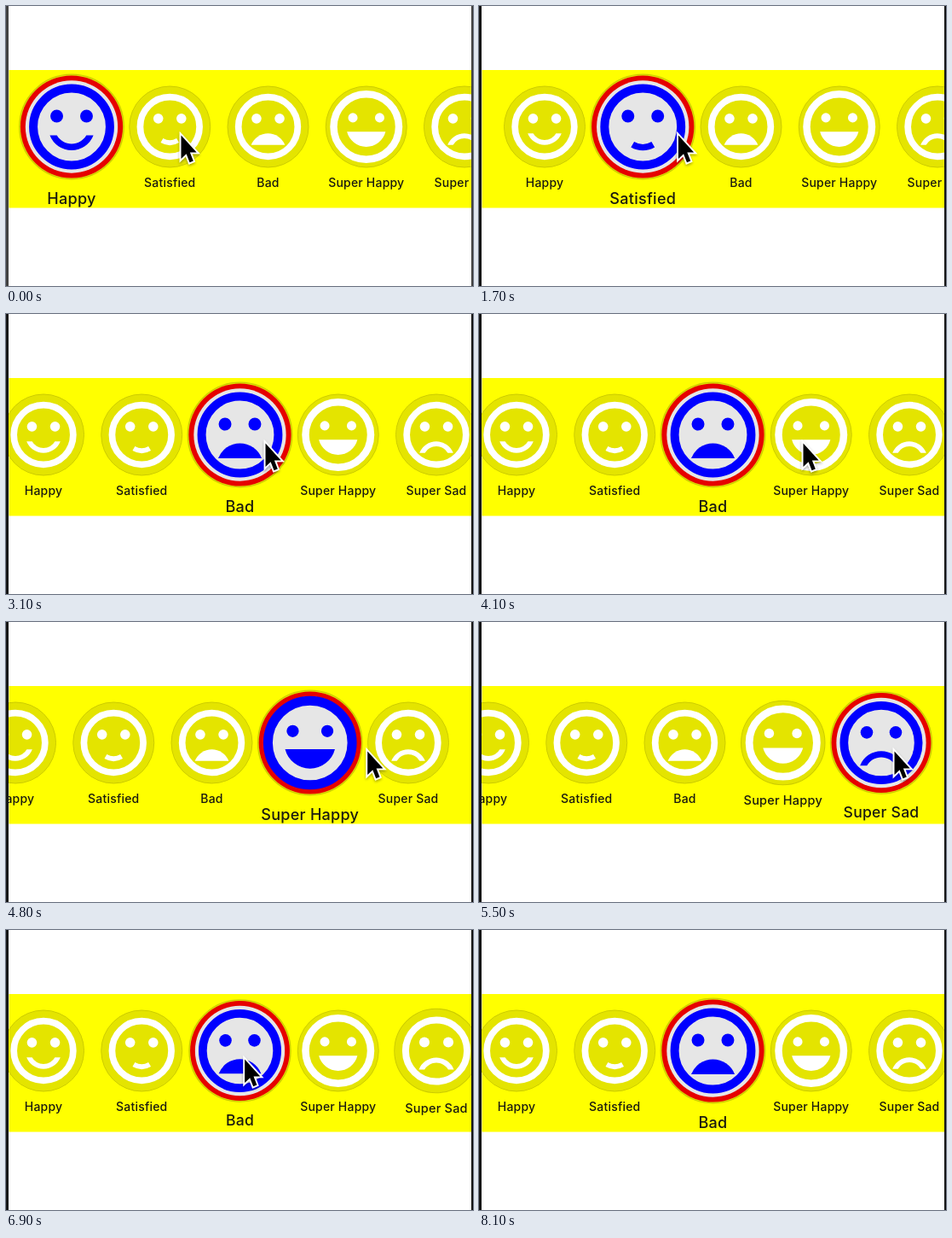
Animation of 548 by 328 pixels, one loop 9.1 s. Source, as an HTML page:

```html
<!DOCTYPE html>
<html lang="en">
<head>
<meta charset="utf-8">
<title>Mood picker</title>
<style>
  html, body { margin: 0; width: 100%; height: 100%; overflow: hidden; background: #fff; }
  svg { display: block; width: 548px; height: 328px; }
  text { font: 500 14px Inter, Roboto, sans-serif; letter-spacing: .2px; text-anchor: middle; fill: #1a1a10; }
  .item { --ink: #fff; --face: #e4e400; --rim: #e4e400; }
  .item.on { --ink: #00f; --face: #e6e6e6; --rim: #e60000; }
  .edge { fill: #e4e400; stroke: #cccc00; }
  .rim { fill: var(--rim); }
  .face { fill: var(--face); }
  .ink { fill: var(--ink); }
  .line { fill: none; stroke: var(--ink); }
</style>
</head>
<body>
<svg viewBox="0 0 548 328">
  <defs>
    <clipPath id="view"><rect x="3" y="74" width="543" height="164"/></clipPath>
    <filter id="shade" x="-50%" y="-50%" width="200%" height="200%">
      <feDropShadow dx="0" dy="1" stdDeviation="1" flood-opacity=".35"/>
    </filter>
  </defs>
  <rect width="548" height="328" fill="#fff"/>
  <rect x="3.5" y="75" width="542.5" height="161.5" fill="#ff0"/>
  <g id="list" clip-path="url(#view)"></g>
  <g id="frame"><rect width="3" height="328"/><rect x="546" width="2" height="328"/></g>
  <path id="cursor" filter="url(#shade)" stroke="#fff" stroke-width="2.2" paint-order="stroke"
    d="M.3 0V16.2L3.9 12.8L6.2 18.7L8.7 17.6L6.4 11.7H11Z"/>
</svg>
<script>
const LOOP = 9100, STEP = 100;
const FIRST_X = 77, GAP = 115.25, MID_Y = 141.5, GROW = 0.29;
const $ = id => document.getElementById(id);
const clamp = (v, lo, hi) => Math.max(lo, Math.min(hi, v));
const easeOut = (u, power) => 1 - (1 - clamp(u, 0, 1)) ** power;

// Every mouth is cut from circles around the face centre by a level line.
const half = (r, y) => Math.sqrt(r * r - y * y);
const arc = (r, y) => `M${-half(r, y)} ${y}A${r} ${r} 0 0 0 ${half(r, y)} ${y}`;
const grin = y => `<path class="ink" d="${arc(5.5, y)}Z"/>`;
const smile = y => {
  const x = half(4, y);
  return `<path class="ink" d="${arc(5.5, y)}H${x}A4 4 0 0 1 ${-x} ${y}Z"/>`;
};
const smirk = y => `<path class="line" stroke-width="1.5" d="${arc(4.8, y)}"/>`;
const flip = mouth => `<g transform="matrix(1 0 0 -1 0 7.5)">${mouth}</g>`;
const eye = (x, r) => `<circle class="ink" cx="${x}" cy="-2.5" r="${r}"/>`;

const moods = [
  { name: 'Happy', mouth: smile(2) },
  { name: 'Satisfied', mouth: smirk(4.15) },
  { name: 'Bad', mouth: flip(grin(2)) },
  { name: 'Super Happy', mouth: grin(1.37), size: 4.25, eyeX: 3.7, eyeR: 1.3 },
  { name: 'Super Sad', mouth: flip(smile(2)) }
];

$('list').innerHTML = moods.map(({ name, mouth, size = 3.87, eyeX = 3.5, eyeR = 1.5 }) => `
  <g class="item">
    <circle class="edge" r="47.5"/>
    <circle class="rim" r="46.6"/>
    <circle class="face" r="42"/>
    <g transform="scale(${size})">
      <circle class="line" stroke-width="2" r="9"/>
      ${eye(-eyeX, eyeR)}${eye(eyeX, eyeR)}${mouth}
    </g>
    <text y="70">${name}</text>
  </g>`).join('');
const items = [...document.querySelectorAll('.item')];

const clicks = [
  { at: -1000, mood: 0 }, { at: 1200, mood: 1 }, { at: 2600, mood: 2 },
  { at: 4300, mood: 3 }, { at: 5400, mood: 4 }, { at: 6800, mood: 2 }
];
const scrollFor = mood => clamp((mood - 1) * 33, 0, 66);

// The pointer rests between these trips; the last one leaves the stage.
const home = { x: 205, y: 151.5 };
const trips = [
  { at: 1620, ms: 700, x: 337 }, { at: 2500, ms: 200, x: 304 },
  { at: 3500, ms: 600, x: 380 }, { at: 4680, ms: 520, x: 487 },
  { at: 5800, ms: 700, x: 239.5 }, { at: 6700, ms: 400, x: 293 },
  { at: 7900, ms: 200, x: 16, y: 350 }
];

function pointer(t) {
  return trips.reduce((p, { at, ms, x, y = p.y }) => {
    const k = easeOut((t - at) / ms, 2);
    return { x: p.x + (x - p.x) * k, y: p.y + (y - p.y) * k };
  }, home);
}

function draw(t) {
  const n = clicks.findLastIndex(c => c.at <= t);
  const { at, mood } = clicks[n];
  const last = clicks[n - 1]?.mood;
  const p = easeOut((t - at) / 200, 3);

  items.forEach((el, i) => {
    const grown = i === mood ? p : i === last ? 1 - p : 0;
    const x = FIRST_X + GAP * i - scrollFor(mood);
    el.classList.toggle('on', i === mood);
    el.setAttribute('transform', `translate(${x} ${MID_Y}) scale(${1 + GROW * grown})`);
  });

  const { x, y } = pointer(t);
  $('cursor').setAttribute('transform', `translate(${x} ${y}) scale(1.7)`);
  $('frame').setAttribute('fill', t < 800 ? '#414141' : '#161616');
}

const begin = performance.now();
function tick() {
  const t = (performance.now() - begin) % LOOP;
  draw(Math.floor(t / STEP) * STEP);
  requestAnimationFrame(tick);
}
tick();
</script>
</body>
</html>
```
